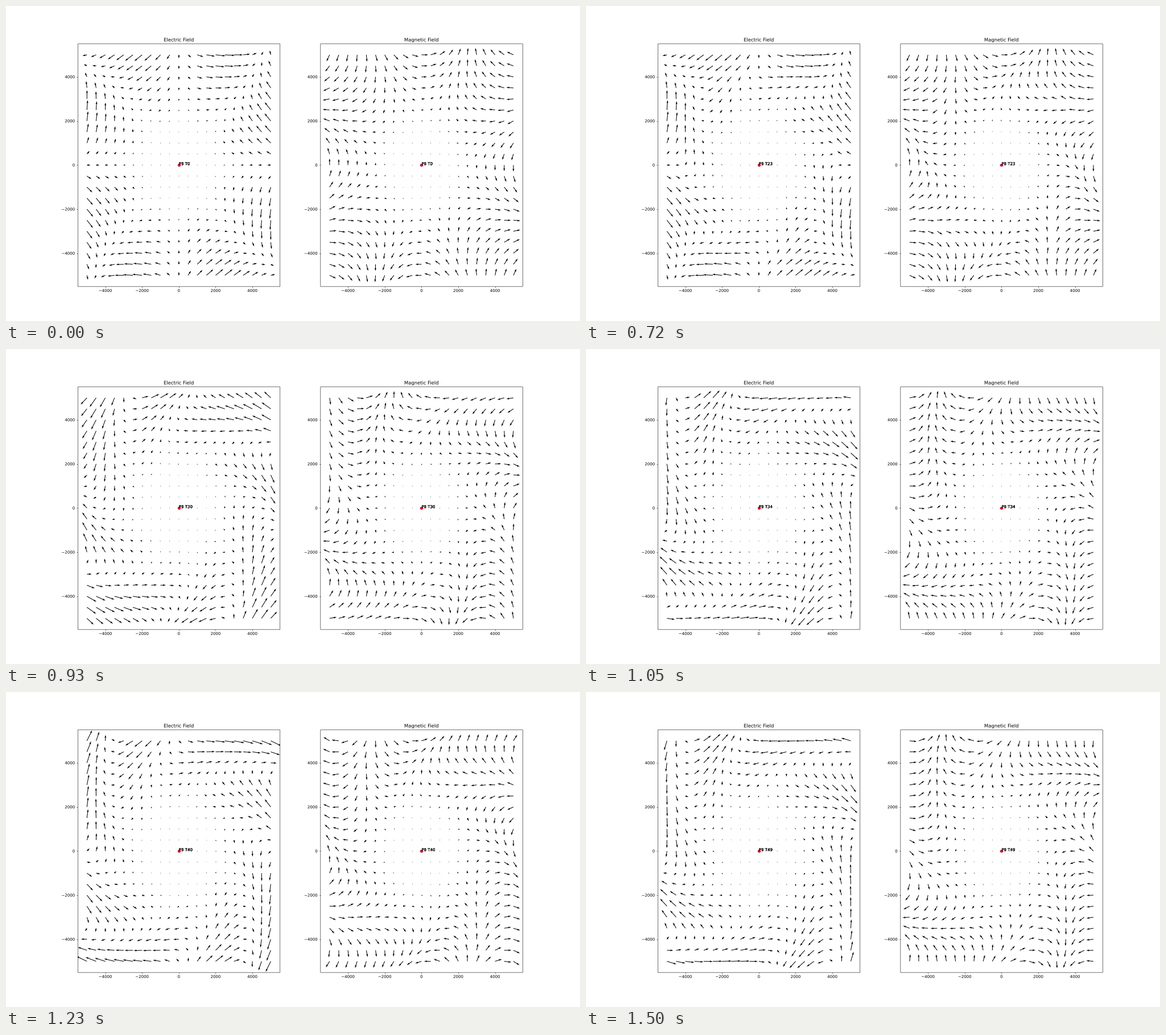
Animation, 1009 px wide and 555 px high, one loop 1.53 s. Source, as a matplotlib script:

```python
import numpy as np
import matplotlib.pyplot as plt
from matplotlib.animation import FuncAnimation
from matplotlib.lines import Line2D
from matplotlib.patches import Rectangle
from matplotlib.patheffects import Normal
from matplotlib.text import Text
from matplotlib.transforms import Affine2D

FRAMES, INTERVAL = 51, 30
WAVE_SPEED = 500      # grid units per time step
START = 14            # step at which the sources begin to turn
OMEGA = 0.4           # pattern phase per step, radians
PARTICLES = 8

axis = np.linspace(-5000, 5000, 21)
X, Y = np.meshgrid(axis, axis)
R = np.hypot(X, Y)
PHI = np.arctan2(X, Y)    # clockwise from the upward axis


def rise(top, scale, power):
    """Arrow length in pixels, growing with radius and then levelling off."""
    return top * (1 - np.exp(-(R / scale) ** power))


E_TANGENT = rise(20.5, 4450, 2.7)
E_RADIAL = rise(6.5, 3200, 2.6)
B_LENGTH = rise(12.6, 3500, 2.6)
REST_PHASE = 0.35 * np.clip((R - 5000) / 2071, 0, 1)


def phase(step):
    retarded = step - R / WAVE_SPEED
    return np.where(retarded > START, OMEGA * (retarded - START + 0.5), REST_PHASE)


def electric(step):
    psi = 4 * PHI + phase(step)
    tangent = E_TANGENT * np.sin(psi)
    radial = 0.27 * tangent - E_RADIAL * np.cos(psi)
    return (radial * np.sin(PHI) + tangent * np.cos(PHI),
            radial * np.cos(PHI) - tangent * np.sin(PHI))


def magnetic(step):
    angle = 3 * PHI + phase(step)
    return B_LENGTH * np.cos(angle), B_LENGTH * np.sin(angle)


fig, axes = plt.subplots(1, 2, figsize=(20, 11.001), dpi=50.45)
panels = []
for ax, title, field in zip(axes, ("Electric Field", "Magnetic Field"),
                            (electric, magnetic)):
    ax.set_title(title)
    ax.set(xlim=(-5500, 5500), ylim=(-5500, 5500))
    ticks = range(-4000, 4001, 2000)
    ax.set_xticks(ticks)
    ax.set_yticks(ticks)
    ax.spines[:].set_visible(False)
    ax.add_patch(Rectangle((0, 0), 1, 1, fill=False, lw=0.8, snap=False,
                           clip_on=False, zorder=2.5,
                           transform=ax.transAxes + Affine2D().translate(0.2, -0.2)))
    arrows = ax.quiver(X, Y, *field(0), scale=1, scale_units="dots")
    for color in ("blue", "red"):
        ax.plot(0, 0, "o", color=color)
    labels = [ax.text(0, 0, "", alpha=0.4) for _ in range(PARTICLES)]
    panels.append((field, arrows, labels))

# Keep lines and glyphs at sub-pixel positions.
for line in fig.findobj(Line2D):
    line.set_snap(False)
for text in fig.findobj(Text):
    text.set_path_effects([Normal()])


def update(frame):
    step = max(0, frame - 1)
    for field, arrows, labels in panels:
        arrows.set_UVC(*field(step))
        for i, label in enumerate(labels):
            label.set_text(f"P{i} T{step}")
    return []


anim = FuncAnimation(fig, update, frames=FRAMES, interval=INTERVAL,
                     init_func=lambda: update(0), repeat=True, repeat_delay=0)
plt.show()
```
